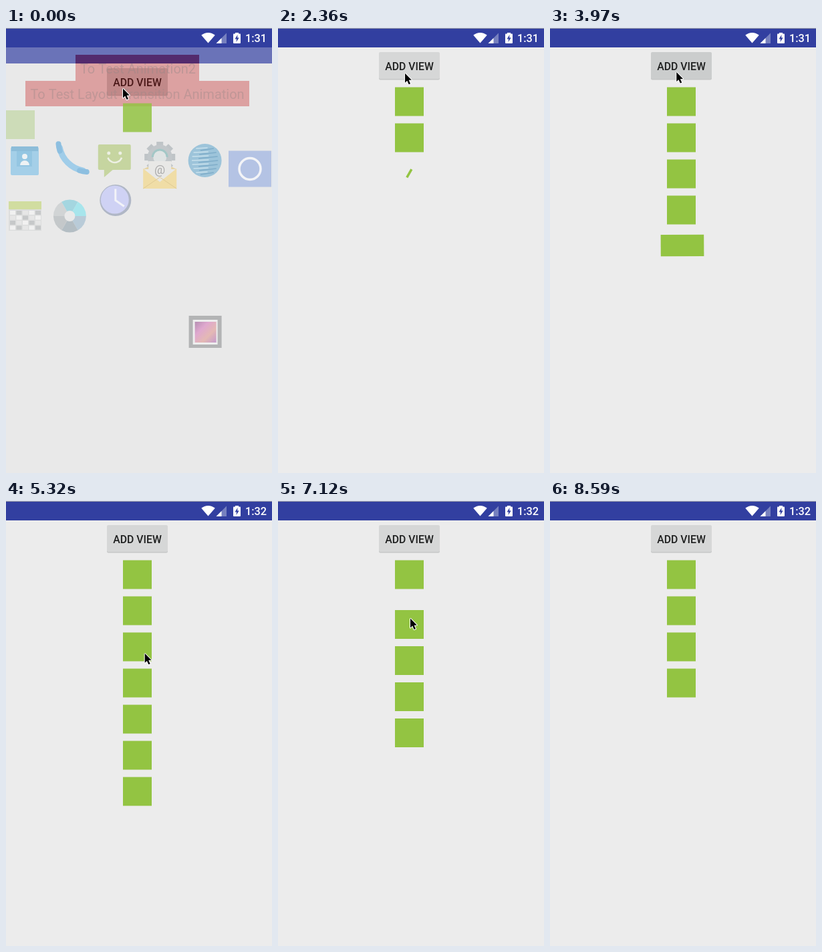
An HTML page with a canvas for the animation above (9330 ms loop, 398 by 665 pixels).

```html
<!DOCTYPE html>
<html lang="en">
<head>
<meta charset="utf-8">
<title>Layout transition</title>
<style>
html, body { margin: 0; width: 100%; height: 100%; overflow: hidden; background: #ececec; }
canvas { display: block; width: 100vw; height: 100vh; }
</style>
</head>
<body>
<canvas id="stage" width="398" height="665"></canvas>
<script>
const ctx = document.getElementById('stage').getContext('2d');
const FONT = 'Roboto, "Open Sans", sans-serif';
const LOOP = 9330, LAST = 8590, STEP = LAST / 58;
const CX = 196.5, CY = 109, PITCH = 54;
const DUR = 300; // every view animation
const ADDS = [-DUR, 1356, 2314, 3340, 3799, 4150, 4650];
const REMOVES = [5735, 6694, 7600];
const POINTER = [
  [0, 174, 90], [440, 190, 69], [4570, 188, 65], [5320, 207, 229],
  [5700, 197, 175], [7900, 197, 175], [LAST, 257, 395]
];

const TAU = 2 * Math.PI;
const clamp = v => Math.max(0, Math.min(1, v));
const part = (t, start) => clamp((t - start) / DUR);
const smooth = p => (1 - Math.cos(Math.PI * p)) / 2;
const decel = p => 1 - (1 - p) ** 2;
const mix = (a, b, p) => a + (b - a) * p;

// The screen refreshes in coarse steps
const snap = t => Math.min(LAST, Math.floor(t / STEP + 0.2) * STEP);

function rect(color, x, y, w, h, r = 0) {
  ctx.fillStyle = color;
  ctx.beginPath();
  ctx.roundRect(x, y, w, h, r);
  ctx.fill();
}
function wedge(color, x, y, r, a, b) {
  ctx.fillStyle = color;
  ctx.beginPath();
  ctx.moveTo(x, y);
  ctx.arc(x, y, r, a, b);
  ctx.fill();
}
const disc = (color, x, y, r) => wedge(color, x, y, r, 0, TAU);

function arc(color, width, x, y, r, a = 0, b = TAU) {
  ctx.strokeStyle = color;
  ctx.lineWidth = width;
  ctx.beginPath();
  ctx.arc(x, y, r, a, b);
  ctx.stroke();
}
function trace(pts) {
  ctx.beginPath();
  for (let i = 0; i < pts.length; i += 2) ctx.lineTo(pts[i], pts[i + 1]);
}
function poly(color, ...pts) {
  ctx.fillStyle = color;
  trace(pts);
  ctx.fill();
}
function line(color, width, ...pts) {
  ctx.strokeStyle = color;
  ctx.lineWidth = width;
  trace(pts);
  ctx.stroke();
}
function text(str, color, font, x, y) {
  ctx.fillStyle = color;
  ctx.font = font + ' ' + FONT;
  ctx.textAlign = 'center';
  ctx.fillText(str, x, y);
}
function at(x, y, paint) {
  ctx.save();
  ctx.translate(x, y);
  paint();
  ctx.restore();
}

function statusBar(t) {
  const blue = '#323fa0';
  rect(blue, 0, 0, 398, 29);
  rect('#a3a5ad', 0, 0, 398, 1);
  wedge('#fff', 302.5, 22.5, 15.5, -2.29, -0.85);
  poly('#7680bf', 330, 7.5, 330, 23, 314.5, 23);
  poly('#fff', 322.5, 15, 322.5, 23, 314.5, 23);
  rect('#fff', 340, 8.5, 11, 14.5, 1);
  rect('#fff', 343, 7, 5, 2);
  poly(blue, 346.5, 10, 342.5, 16.5, 345, 16.5, 344.5, 21, 348.7, 14.6, 346.2, 14.6);
  text(t < 4700 ? '1:31' : '1:32', '#fff', '500 16.3px', 374, 21);
}

// Launcher icons, each drawn around its own centre
function contacts() {
  rect('#a4cfe8', -21, -20, 42, 42, 2);
  rect('#8dbdd9', -20, -21, 40, 7);
  rect('#94c6e2', -12, -14, 23, 23);
  disc('#eef2f4', 0, -6, 4);
  wedge('#eef2f4', 0, 7, 7, Math.PI, TAU);
}
function phone() {
  ctx.lineCap = 'round';
  arc('#a0cde9', 9, 28, -28, 44, 1.75, 2.95);
  for (const a of [1.75, 2.95]) arc('#8dbfe0', 8, 28, -28, 45, a - 0.12, a + 0.12);
}
function bubble() {
  rect('#c6d5a0', -25, -24, 49, 38, 2);
  poly('#c6d5a0', -16, 13, -2, 13, -16, 25);
  for (const x of [-9, 8]) disc('#edf0e4', x, -11, 2.5);
  arc('#edf0e4', 2.5, 0, -8, 11, 0.35, Math.PI - 0.35);
}
function gear() {
  for (let i = 0; i < 8; i++) {
    ctx.rotate(TAU / 8);
    rect('#bfc4c7', -5, -23, 10, 9);
  }
  arc('#c2c7ca', 9, 0, 0, 14);
  disc('#dfe3e3', 0, 0, 10);
  arc('#a3c7c6', 3, 0, 0, 11, Math.PI, TAU);
}
function mail() {
  poly('#e5d3a4', -25, -12, 0, -24, 25, -12);
  rect('#e8e8e6', -17, -24, 34, 30);
  text('@', '#aaa', '18px', 0, -5);
  poly('#f0dda6', -25, -13, 0, 7, 25, -13, 25, 17, -25, 17);
  line('#dfca94', 1, -25, 17, 0, 0, 25, 17);
}
function globe() {
  disc('#9dc4da', 0, 0, 25);
  for (let y = -18; y <= 18; y += 6) {
    const w = Math.sqrt(600 - y * y) * 0.8;
    line('#c9e1ec', 1.5, -w, y, w * 0.3, y - 1);
    line('#7fadc9', 1.5, -w * 0.5, y + 3, w, y);
  }
}
function ring() {
  rect('#b4c3e4', -32, -27, 64, 54);
  arc('#f3f4f7', 3.5, 0, 0, 16);
}
function calendar() {
  rect('#dcdddd', -24, -22, 49, 44);
  rect('#d1dda0', -24, -22, 49, 12);
  for (let i = 0; i < 20; i++) {
    rect(['#f1f1f1', '#c6c8c9', '#e6e6e6'][i * 7 % 3], -22 + i % 5 * 9.5, -8 + (i / 5 | 0) * 7.5, 8, 6);
  }
}
function shutter() {
  ['#b9cbd8', '#b4bec4', '#c4c8ca', '#d1d4d5', '#a4d6e0', '#a7e5ec'].forEach((c, i) =>
    wedge(c, 0, 0, 24.5, i * TAU / 6, (i + 1) * TAU / 6));
  disc('#e9e9e9', 0, 0, 8);
}
function clock() {
  disc('#b0b7c6', 0, 0, 23.5);
  disc('#cfd2f4', -1, -1, 21);
  line('#f2f3f8', 3, 0, -17, 0, 0, 13, 9);
}
function gallery() {
  rect('#b3b4b5', -24, -24, 49, 48);
  rect('#eee', -18, -18, 37, 37);
  const g = ctx.createLinearGradient(-15, -15, 16, 16);
  ['#b58fb2', '#dfa8cf', '#e4b9b4', '#c79ccb'].forEach((c, i) => g.addColorStop(i / 3, c));
  rect(g, -15, -15, 32, 31);
}
const column = i => 28 + 67.4 * i;
const ROWS = [
  [199, [contacts, phone, bubble, gear, globe]],
  [282, [calendar, shutter]]
];

// Screens that fade out while the new one slides in
function leaving(alpha, off) {
  ctx.save();
  ctx.globalAlpha = alpha;
  rect('#6a73b8', 0, 29, 398, off);
  rect('#cddcb8', 0, 123, 43, 43);
  for (const [y, icons] of ROWS) icons.forEach((icon, i) => at(column(i), y - (icon === gear ? 6 : 1), icon));
  at(column(3), 223, mail);
  at(column(5), 210.5, ring);
  at(column(2) + 1, 257.5, clock);
  at(column(4), 454, gallery);
  const red = 'rgba(204,73,73,.45)', edge = Math.max(40, 29 + off);
  rect('#532b6d', 104, 40, 185, edge - 40);
  rect(red, 104, edge, 185, 79 - edge);
  rect(red, 29, 79, 335, 38);
  text('To Test Animation2', '#bd9696', '20px', CX + 1, 68);
  text('To Test Layout Transition Animation', '#c09696', '20px', CX, 106);
  rect('rgba(80,40,40,.13)', 151, 36 + off, 91, 41, 2);
  ctx.restore();
}

function button(t, off) {
  const down = ADDS.some(a => t > a - 190 && t < a - 100);
  rect('#c6c7c7', 151, 37 + off, 91, 40.5, 2);
  rect(down ? '#cbcdcd' : '#d6d7d7', 151, 36 + off, 91, 40, 2);
}

// A view turns once while it grows; its height overshoots to double
function view(y, f) {
  if (f <= 0) return;
  at(CX, y, () => {
    ctx.rotate(TAU * f);
    ctx.scale(f, f < 0.5 ? 4 * f : 3 - 2 * f);
    rect('#93c442', -21.5, -20.5, 43, 43);
  });
}

// Each removal takes the second view, then those below close the gap
function views(t, off) {
  ADDS.forEach((start, i) => {
    let f = smooth(part(t, start)), slot = i;
    REMOVES.forEach((gone, j) => {
      if (i === j + 1) f -= smooth(part(t, gone));
      if (i > j + 1) slot -= decel(part(t, gone + DUR));
    });
    view(CY + off + slot * PITCH, f);
  });
}

function pointer(t) {
  const i = POINTER.findIndex(p => p[0] > t);
  if (i < 0) return;
  const [a, x, y] = POINTER[i - 1], [b, u, v] = POINTER[i];
  const p = (t - a) / (b - a);
  at(mix(x, u, p), mix(y, v, p), () => {
    const shape = [1, 0.5, 1, 14.5, 4.2, 11.6, 6.6, 17, 9, 16, 6.6, 10.7, 10.8, 10.5, 1, 0.5];
    ctx.lineJoin = 'round';
    line('#fff', 2, ...shape);
    poly('#000', ...shape);
  });
}

function draw(t) {
  const rest = clamp(1 - t / 300), off = 24 * rest ** 4, ghost = rest ** 2;
  rect(ghost > 0.5 ? '#e9e9e9' : '#ececec', 0, 0, 398, 665);
  button(t, off);
  if (ghost > 0) leaving(ghost, off);
  text('ADD VIEW', ghost > 0.5 ? '#4a1717' : '#1e1f1f', '500 15.8px', CX, 62.6 + off);
  ctx.globalAlpha = 1 - 0.15 * ghost;
  views(t, off);
  ctx.globalAlpha = 1;
  statusBar(t);
  pointer(t);
}

const begin = performance.now();
function tick() {
  draw(snap((performance.now() - begin) % LOOP));
  requestAnimationFrame(tick);
}
tick();
</script>
</body>
</html>
```
